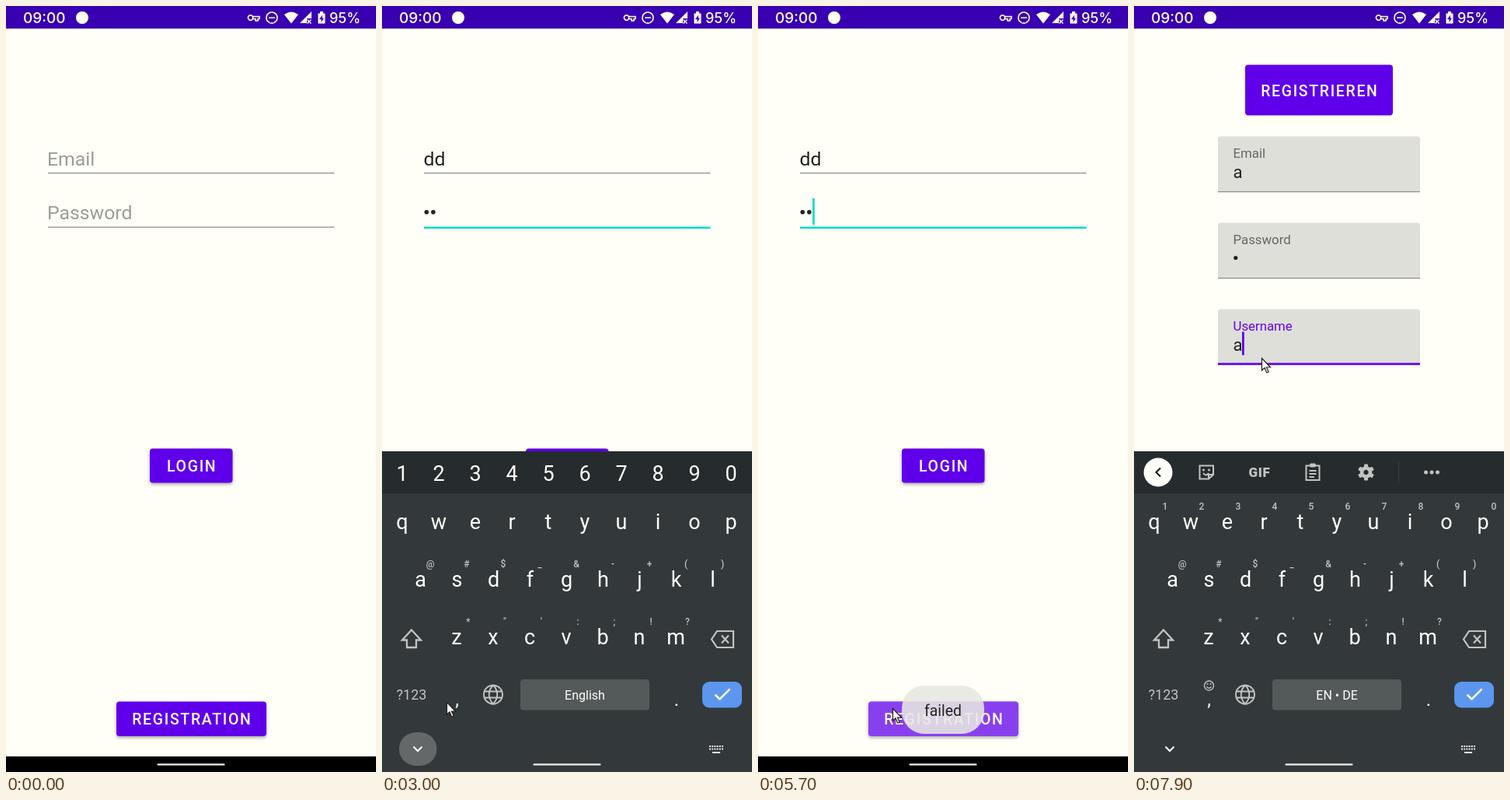
Animation of 476 by 984 pixels, one loop 8 s. Source, as an HTML page with a canvas:

```html
<!DOCTYPE html>
<html lang="en">
<head>
<meta charset="utf-8">
<title>Login and registration</title>
<style>
  html, body { margin: 0; width: 476px; height: 984px; overflow: hidden; background: #fffffa; }
  canvas { display: block; }
</style>
</head>
<body>
<canvas id="stage" width="476" height="984"></canvas>
<script>
const ctx = document.getElementById('stage').getContext('2d');
const LOOP = 8000;
const PAPER = '#fffff8', WHITE = '#fffffa', PURPLE = '#6000ea', STATUS = '#3800b0', TEAL = '#06dac4';
const INK = '#222222', HINT = '#9c9c98', RULE = '#8e8e8a', KEYS = '#33393b', TOOLS = '#262c2e', ICON = '#c2c4c2';

const clamp = v => Math.max(0, Math.min(1, v));
const ramp = (t, from, to) => clamp((t - from) / (to - from));
const easeOut = p => 1 - (1 - p) ** 2;
const smooth = p => p * p * (3 - 2 * p);
const mix = (a, b, p) => a + (b - a) * p;

function text(str, x, y, size, color, { align = 'left', weight = 400, spacing = 0, font = 'Roboto' } = {}) {
  ctx.font = `${weight} ${size}px ${font}, sans-serif`;
  ctx.letterSpacing = spacing + 'px';
  ctx.textAlign = align;
  ctx.fillStyle = color;
  ctx.fillText(str, x, y);
}

function rect(x, y, w, h, color, radius = 0) {
  ctx.fillStyle = color;
  ctx.beginPath();
  ctx.roundRect(x, y, w, h, radius);
  ctx.fill();
}

function disc(x, y, r, color) {
  ctx.fillStyle = color;
  ctx.beginPath();
  ctx.arc(x, y, r, 0, 7);
  ctx.fill();
}

// Path around its own centre; a width strokes it, no width fills it.
function icon(x, y, d, color = ICON, width = 0) {
  const path = new Path2D(d);
  ctx.save();
  ctx.translate(x, y);
  ctx.fillStyle = ctx.strokeStyle = color;
  ctx.lineWidth = width;
  if (width) ctx.stroke(path); else ctx.fill(path);
  ctx.restore();
}

function faded(alpha, dy, draw) {
  if (alpha <= 0) return;
  ctx.save();
  ctx.globalAlpha = alpha;
  ctx.translate(0, dy);
  draw();
  ctx.restore();
}

function statusBar() {
  rect(0, 0, 476, 29, STATUS);
  text('09:00', 22, 22, 19, WHITE, { weight: 500, font: 'Inter' });
  disc(98, 15, 8, WHITE);
  icon(319, 15, 'M-1.2 0A3.2 3.2 0 1 0-1.2.1M-1-1.5H7V1.5H5V4H2V1.5H-1', WHITE, 1.6);
  icon(342, 15, 'M7 0A7 7 0 1 0 7 .1M-4 0H4', WHITE, 1.6);
  icon(367, 15, 'M0 7.5L-9-4Q0-11 9-4Z', WHITE);
  icon(386, 15, 'M7-8V1H1V7H-8ZM2 2L7 7L6 8L1 3ZM6 2L7 3L2 8L1 7Z', WHITE);
  icon(406, 15, 'M-4.5-5.5H-2V-8H2V-5.5H4.5V7.5H-4.5Z', WHITE);
  icon(406, 15.5, 'M1-4L-3 1.5H-.5V5.5L3 0H.7Z', STATUS);
  text('95%', 416, 21.5, 18, WHITE, { weight: 500, font: 'Inter' });
}

function button(label, x, y, w, h, baseline, ripple) {
  ctx.save();
  if (ripple) {
    ctx.shadowColor = 'rgba(0,0,0,.35)';
    ctx.shadowBlur = 4;
    ctx.shadowOffsetY = 2;
  }
  rect(x, y, w, h, PURPLE, 4);
  ctx.restore();
  if (ripple && ripple.age > 0) {
    ctx.save();
    ctx.beginPath();
    ctx.roundRect(x, y, w, h, 4);
    ctx.clip();
    ctx.globalAlpha = .25 * (1 - ramp(ripple.age, 300, 550));
    disc(ripple.x, ripple.y, ripple.max * clamp(ripple.age / 150), WHITE);
    ctx.restore();
  }
  text(label, x + w / 2 + .9, baseline, 19.4, WHITE, { align: 'center', weight: 500, spacing: 1.73 });
}

function loginPage(t) {
  const onEmail = t >= 850 && t < 2400, onPassword = t >= 2400;
  const emailLength = (t >= 1750) + (t >= 1950);
  const typed = (t >= 2600) + (t >= 2750);
  const blinkOn = Math.floor((t - 2400) / 500) % 2 === 0;

  if (emailLength) text('d'.repeat(emailLength), 53.5, 205, 24.8, INK);
  else text('Email', 53, 205, 24.8, HINT);
  rect(54, 214, 368.5, onEmail ? 2.6 : 1.3, onEmail ? TEAL : RULE);

  if (!typed) text('Password', 53, 274, 24.8, HINT);
  const dots = t >= 2900 ? typed : Math.max(0, typed - 1);
  for (let i = 0; i < dots; i++) disc(57.3 + 8.6 * i, 264.7, 2.8, INK);
  if (typed > dots) text('d', 53.5 + 8.6 * dots, 274, 24.8, INK);
  rect(54, 283.5, 368.5, onPassword ? 2.6 : 1.3, onPassword ? TEAL : RULE);

  if (onEmail && Math.floor((t - 850) / 500) % 2 === 0) rect(53 + 14 * emailLength, 178, 2.6, 34, TEAL);
  if (onPassword && blinkOn) rect(53 + 8.6 * dots + (typed > dots ? 14 : 0), 247, 2.6, 34, TEAL);

  button('LOGIN', 185, 568.5, 106.5, 44, 598, { age: t - 3500, x: 208, y: 588, max: 90 });
  button('REGISTRATION', 142, 893.5, 193, 44.5, 923, { age: t - 5550, x: 173, y: 905, max: 170 });
}

const FIELDS = [
  { label: 'Email', focus: 6550, blur: 7350, typed: 7050 },
  { label: 'Password', focus: 7350, blur: 7650, typed: 7500, secret: true },
  { label: 'Username', focus: 7650, blur: LOOP, typed: 7800 }
];

function field({ label, focus, blur, typed, secret }, y, t) {
  const active = t >= focus && t < blur;
  const lift = easeOut(ramp(t, focus + 50, focus + 217));
  const hasText = t >= typed;
  rect(108, y, 260, 71.5, '#dedfd9', [4, 4, 0, 0]);
  rect(108, y + (active ? 69 : 70.5), 260, active ? 2.8 : 1.2, active ? PURPLE : RULE);
  text(label, 127.5, y + mix(42, 27, lift), mix(22.2, 16.8, lift), active && lift ? PURPLE : '#666664');
  if (hasText) {
    if (secret && !active) disc(130.8, y + 45, 2.6, INK);
    else text('a', 127.5, y + 53, 22.2, INK);
  }
  const since = t - (hasText ? typed : focus);
  if (active && since % 1000 < 500) rect(hasText ? 139 : 127.3, y + 29, 2.8, 30, PURPLE);
}

function registrationPage(t) {
  rect(0, 29, 476, 955, PAPER);
  button('REGISTRIEREN', 143, 75.5, 190, 65, 116);
  FIELDS.forEach((f, i) => field(f, 167.5 + 111 * i, t));
}

const TOOL_ICONS = {
  clipboard(x) {
    icon(x, 599, 'M-8.5-8.5H8.5V10H-8.5ZM-4.5-2H4.5M-4.5 2H4.5M-4.5 6H2', ICON, 2);
    rect(x - 4, 587.5, 8, 5, ICON, 2);
  },
  gear(x) {
    icon(x, 599, 'M5.5 0A5.5 5.5 0 1 0 5.5 .1', ICON, 4.5);
    for (let a = 0; a < 6; a++) {
      ctx.save();
      ctx.translate(x, 599);
      ctx.rotate(a * Math.PI / 3);
      rect(-2.5, -10.5, 5, 4, ICON, 1);
      ctx.restore();
    }
  },
  palette(x) {
    icon(x, 599, 'M0-10C14-10 13 3 5 3C1 3 4 10 0 10C-13 10-13-10 0-10Z');
    for (const [dx, dy] of [[-6, -1], [-3, -5], [3, -5], [6, -1]]) disc(x + dx, 599 + dy, 1.6, TOOLS);
  },
  touch(x) {
    icon(x, 599, 'M2 8.5H-8.5V-8.5H8.5V0', ICON, 2);
    icon(x, 599, 'M-2-3L4 2V-3H6L10 4V10H5L0 5L3 4Z');
  },
  sticker(x) {
    icon(x, 599, 'M9 3V-8.5H-8.5V8.5H3ZM3 8.5V3H9M-4 1Q0 6 3 1', ICON, 2);
    disc(x - 3.5, 596, 1.5, ICON);
    disc(x + 3.5, 596, 1.5, ICON);
  },
  gif(x) { text('GIF', x, 605, 17, ICON, { align: 'center', weight: 900, spacing: .6 }); }
};

const LAYOUTS = {
  email: { tools: ['clipboard', 'gear', 'palette', 'touch'], space: 'EN • DE', comma: '@' },
  password: { space: 'English', comma: ',' },
  text: { tools: ['sticker', 'gif', 'clipboard', 'gear'], space: 'EN • DE', comma: ',', emoji: true }
};

const ROWS = [
  { keys: 'qwertyuiop', hints: '1234567890', x: 26, y: 671.5, hintX: 40, hintY: 646.5 },
  { keys: 'asdfghjkl', hints: '@#$_&-+()', x: 49.5, y: 745.5, hintX: 62, hintY: 721 },
  { keys: 'zxcvbnm', hints: '*"\':;!?', x: 96, y: 819.5, hintX: 111, hintY: 795 }
];

function keyboard(layout, next) {
  const { tools, space, comma, emoji } = LAYOUTS[layout];
  const center = { align: 'center' };
  rect(0, 572, 476, 412, KEYS);
  rect(0, 572, 476, 54, TOOLS);
  if (tools) {
    disc(31, 599, 18.5, WHITE);
    icon(31, 599, 'M3-5.5L-2.5 0L3 5.5', INK, 2.2);
    tools.forEach((name, i) => TOOL_ICONS[name](93 + 68.5 * i));
    rect(340, 585, 1, 28, '#3a4042');
    for (const x of [375.5, 383, 390.5]) disc(x, 599, 2.5, ICON);
  } else {
    [...'1234567890'].forEach((n, i) => text(n, 26 + 47 * i, 610, 27, WHITE, center));
  }
  ROWS.forEach((row, r) => {
    [...row.keys].forEach((key, i) => {
      text(key, row.x + 47 * i, row.y, 27, WHITE, center);
      if (tools || r) text(row.hints[i], row.hintX + 47 * i, row.hintY, 12, ICON, { align: 'center', weight: 500 });
    });
  });
  icon(38, 813, 'M0-11.5L12 1.5H6V11H-6V1.5H-12Z', ICON, 2.3);
  icon(438, 813.5, 'M-7-10.5H14V10.5H-7L-14 0ZM-1-5L8 5M8-5L-1 5', ICON, 2.2);

  text('?123', 38, 891, 18, ICON, center);
  text(comma, 96.5, comma === '@' ? 893 : 899, comma === '@' ? 22 : 24, WHITE, center);
  if (emoji) icon(96.5, 873, 'M6 0A6 6 0 1 0 6 .1M-3 1.5Q0 5 3 1.5M-3-2H-1M1-2H3', ICON, 1.3);
  icon(143, 884.5, 'M12 0A12 12 0 1 0 12 .1M-11-4H11M-11 4H11M0-12C-7-5-7 5 0 12C7 5 7-5 0-12', ICON, 1.9);
  rect(178, 865, 166, 39.5, '#54595a', 4);
  text(space, 261, 891, 16, WHITE, center);
  text('.', 379, 899, 24, WHITE, center);
  rect(412, 868, 51, 33.5, '#5c96ee', 9);
  if (next) icon(438, 884.5, 'M-13 0H8M2-6.5L8.5 0L2 6.5M12.5-7V7', WHITE, 2.5);
  else icon(438, 884.5, 'M-9.5 0L-3.5 6L9.5-7', WHITE, 2.5);
}

function navigation(keys, t) {
  rect(0, 964, 476, 20, '#000');
  faded(keys, 0, () => {
    rect(0, 926, 476, 58, KEYS);
    const press = ramp(t, 2920, 2990) * (1 - ramp(t, 3100, 3400));
    faded(press, 0, () => rect(22, 933, 48.5, 43, '#646868', 21.5));
    icon(46, 954.5, 'M-5.5-3L0 2.5L5.5-3', WHITE, 2);
    for (let y = 0; y < 2; y++) for (let x = 0; x < 6; x++) rect(421 + 3.2 * x, 950 + 3.5 * y, 2, 2, '#ecece8');
    rect(425, 958, 10, 2, '#ecece8');
  });
  rect(194.5, 973.3, 87, 2.2, '#eeeeea', 1);
}

function toast(t) {
  const alpha = ramp(t, 4000, 4200) * (1 - ramp(t, 5800, 6050));
  faded(alpha, 0, () => {
    rect(185, 873, 106, 62, 'rgba(232,232,226,.88)', 29);
    text('failed', 238, 911.5, 19.4, INK, { align: 'center' });
  });
}

// Pointer stops: arrive time, leave time, x, y.
const STOPS = [
  [800, 2100, 144, 214], [2350, 2500, 140, 268], [2900, 3100, 83, 894], [3450, 4450, 208, 585],
  [5400, 6050, 173, 902], [6450, 7100, 175, 219], [7300, 7450, 168, 335], [7620, LOOP, 164, 452]
];

function pointer(t) {
  if (t < STOPS[0][0]) return;
  const i = STOPS.findLastIndex(s => t >= s[0]);
  const [, leave, x, y] = STOPS[i];
  const [arrive, , nextX, nextY] = STOPS[i + 1] || [LOOP + 1, 0, x, y];
  const p = smooth(ramp(t, leave, arrive));
  const arrow = 'M.5.5V16L4 12.7L6.7 19L9.2 18L6.5 12H11.5Z';
  const px = mix(x, nextX, p), py = mix(y, nextY, p);
  icon(px, py, arrow, WHITE);
  icon(px, py, arrow, '#202020', 1.2);
}

function render() {
  const t = performance.now() % LOOP;
  rect(0, 0, 476, 984, PAPER);
  const opening = ramp(t, 5900, 6150);
  if (opening < 1) loginPage(t);
  faded(opening, 40 * (1 - easeOut(opening)), () => registrationPage(t));
  toast(t);

  const second = t >= 6000;
  const start = second ? 6650 : 860;
  const hiding = second ? 0 : ramp(t, 3120, 3320);
  const shown = ramp(t, start, start + 90) * (1 - hiding);
  const drop = 40 * (1 - easeOut(ramp(t, start, start + 240)) + hiding);
  const layout = second
    ? (t >= 7350 && t < 7650 ? 'password' : 'text')
    : (t < 2400 ? 'email' : 'password');
  faded(shown, drop, () => keyboard(layout, second ? t < 7650 : t < 2400));

  navigation(shown, t);
  statusBar();
  pointer(t);
  requestAnimationFrame(render);
}
render();
</script>
</body>
</html>
```
